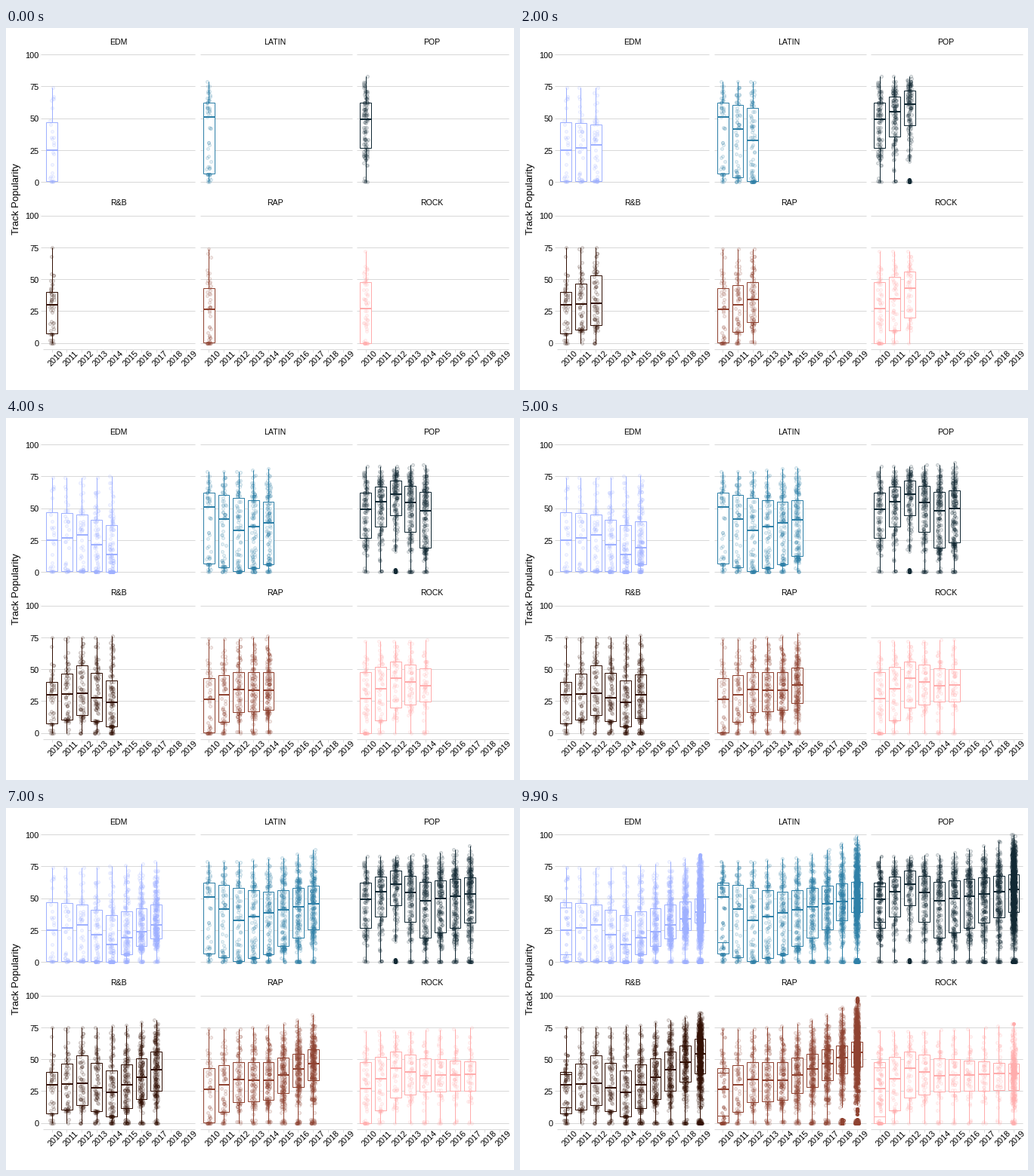
These frames come from a looping animation (672x480 px, 10 s). A matplotlib script:

```python
import numpy as np
import matplotlib.pyplot as plt
from matplotlib.animation import FuncAnimation
from matplotlib.colors import to_rgba
from matplotlib.patches import Rectangle

PT = 0.75  # points per pixel at 96 dpi
GREY = "#d8d8d8"
YEARS = 10
FIRST_YEAR = 2010
KEY_YEARS = [0, 2, 4, 9]
HALF_BOX = 7.4
DOT = 3.9

# Name, colour, quartiles at the key years, first and last maximum,
# track counts in the first, the last but one and the last year.
GENRES = [
    ("EDM", "#9eb0ff",
     ([1, 1, 0, 31], [25, 29, 14, 39], [47, 45, 37, 50]),
     (74, 84), (28, 420, 1400)),
    ("LATIN", "#2e80a8",
     ([6.5, 0.5, 6, 39], [51, 32.5, 38.5, 50], [62.5, 58, 55, 63]),
     (79, 99), (60, 320, 1100)),
    ("POP", "#112833",
     ([27, 44.5, 19, 39], [49, 61, 48, 57], [62, 72, 63, 69]),
     (83, 100), (120, 300, 1300)),
    ("R&B", "#321004",
     ([7.5, 14, 5, 39], [30, 31, 24, 54], [40, 53, 41, 66]),
     (75, 87), (52, 290, 900)),
    ("RAP", "#8f4230",
     ([0.5, 16.5, 18, 44], [26.5, 34, 33.5, 55.5], [43, 48, 48, 64]),
     (74, 98), (55, 440, 1500)),
    ("ROCK", "#ffacac",
     ([0, 20, 24.5, 26], [27, 43, 37, 39], [47.5, 56, 51, 46.5]),
     (72, 78), (60, 50, 380)),
]

rng = np.random.default_rng(12)

fig = plt.figure(figsize=(7, 5), dpi=96, facecolor="white")
ax = fig.add_axes([0, 0, 1, 1])
ax.set_xlim(0, 672)
ax.set_ylim(480, 0)
ax.axis("off")


def center_x(panel, year):
    return 60.72 + 207.5 * (panel % 3) + 19.7 * year


def pixel_y(panel, value):
    return (204.2 if panel < 3 else 417.7) - 1.69 * np.asarray(value)


def line(xs, ys, color, width=1, z=2):
    return ax.plot(xs, ys, color=color, lw=width * PT, zorder=z,
                   solid_capstyle="butt")[0]


def label(x, y, text, size, **kw):
    ax.text(x, y, text, family="Liberation Sans", size=size * PT,
            color="black", **kw)


def dots(xs, ys, face, edge, z):
    return ax.plot(xs, ys, "o", ms=DOT * PT, mew=PT, mfc=face, mec=edge,
                   zorder=z)[0]


def quartiles(panel, year):
    return [np.interp(year, KEY_YEARS, keys) for keys in GENRES[panel][2]]


def track_count(panel, year):
    first, late, last = GENRES[panel][4]
    if year == YEARS - 1:
        return last
    return int(first * (late / first) ** (year / (YEARS - 2)))


def sample(panel, year):
    """Random popularity values that follow the quartiles of one box."""
    q1, q2, q3 = quartiles(panel, year)
    start, end = GENRES[panel][3]
    top = start + (end - start) * (year / (YEARS - 1)) ** 3
    n = track_count(panel, year) // 4
    u = rng.random((4, n))
    low = min(q1, 7)
    near_zero = rng.random(n) < (0.45 if q1 < 12 else 0.25)
    first = np.where(near_zero, 3 * u[0] ** 3,
                     low + (q1 - low) * np.sqrt(u[0]))
    last = q3 + (top - q3) * (1 - np.sqrt(1 - u[3]))
    last[0] = top
    values = [first, q1 + (q2 - q1) * u[1], q2 + (q3 - q2) * u[2], last]
    return np.round(np.concatenate(values))


class YearBox:
    """Box, whiskers, outliers and jittered tracks of one genre and year."""

    def __init__(self, panel, year, values, shift, z=2):
        self.panel = panel
        x, color = center_x(panel, year), GENRES[panel][1]
        q1, self.mid, q3 = quartiles(panel, year)
        reach = 1.5 * (q3 - q1)
        inside = (values >= q1 - reach) & (values <= q3 + reach)
        kept, out = values[inside], values[~inside]
        self.stats = np.array([kept.min(), q1, q3, kept.max()])

        left, right = x - HALF_BOX, x + HALF_BOX
        mid_y = pixel_y(panel, self.mid)
        self.whiskers = [line([x, x], [0, 0], color, z=z) for _ in range(2)]
        self.body = ax.add_patch(Rectangle((left, 0), right - left, 0,
                                           fc="white", ec=color, lw=PT,
                                           zorder=z + 0.1))
        median = line([left, right], [mid_y, mid_y], color, 2, z + 0.2)
        outliers = dots(np.full(len(out), x), pixel_y(panel, out),
                        color, color, z + 0.3)
        self.tracks = dots(x + shift, pixel_y(panel, values),
                           to_rgba(color, 0.11), to_rgba(color, 0.21), z + 3)
        self.artists = [*self.whiskers, self.body, median, outliers,
                        self.tracks]

    def grow(self, scale):
        for artist in self.artists:
            artist.set_visible(scale > 0)
        if scale <= 0:
            return
        low, q1, q3, high = pixel_y(
            self.panel, self.mid + (self.stats - self.mid) * scale)
        self.whiskers[0].set_ydata([low, q1])
        self.whiskers[1].set_ydata([q3, high])
        self.body.set_y(q3)
        self.body.set_height(q1 - q3)
        self.tracks.set_markersize(DOT * PT * scale)


def draw_panel(panel):
    row, column = divmod(panel, 3)
    start = 49 + 207.5 * column
    end = start + 201
    for value in range(0, 101, 25):
        y = pixel_y(panel, value)
        line([start - 3 * (column == 0), end], [y, y], GREY, z=1)
        if column == 0:
            label(43.5, y + 4.6, str(value), 11, ha="right", va="baseline")
    label((start + end) / 2 - 0.9, 22 + 213 * row, GENRES[panel][0], 10.5,
          ha="center", va="baseline")
    if row == 1:
        line([start, end], [426, 426], GREY, z=1)
        for year in range(YEARS):
            x = center_x(panel, year)
            line([x, x], [426, 430], GREY, z=1)
            label(x + 5.4, 438.5, str(FIRST_YEAR + year), 11, rotation=45,
                  ha="center", va="center")


label(14, 226.5, "Track Popularity", 13.2, rotation=90, ha="center",
      va="center")

boxes = [[] for _ in range(YEARS)]
again = []  # first year growing in anew at the end of the loop
for panel in range(len(GENRES)):
    draw_panel(panel)
    for year in range(YEARS):
        values = sample(panel, year)
        shift = rng.uniform(-2.8, 2.8, len(values))
        boxes[year].append(YearBox(panel, year, values, shift))
        if year == 0:
            again.append(YearBox(panel, year, values, shift, z=2.5))


def update(i):
    """Each year grows in over 0.5 s, then holds; earlier years stay."""
    current, step = divmod(i, 10)
    rise = max(0, step - 5) / 5
    for year, group in enumerate(boxes):
        scale = 1 if year <= current else rise * (year == current + 1)
        for box in group:
            box.grow(scale)
    for box in again:
        box.grow(rise * (current == YEARS - 1))
    return []


anim = FuncAnimation(fig, update, frames=100, interval=100, repeat=True,
                     repeat_delay=0, blit=False)
plt.show()
```
